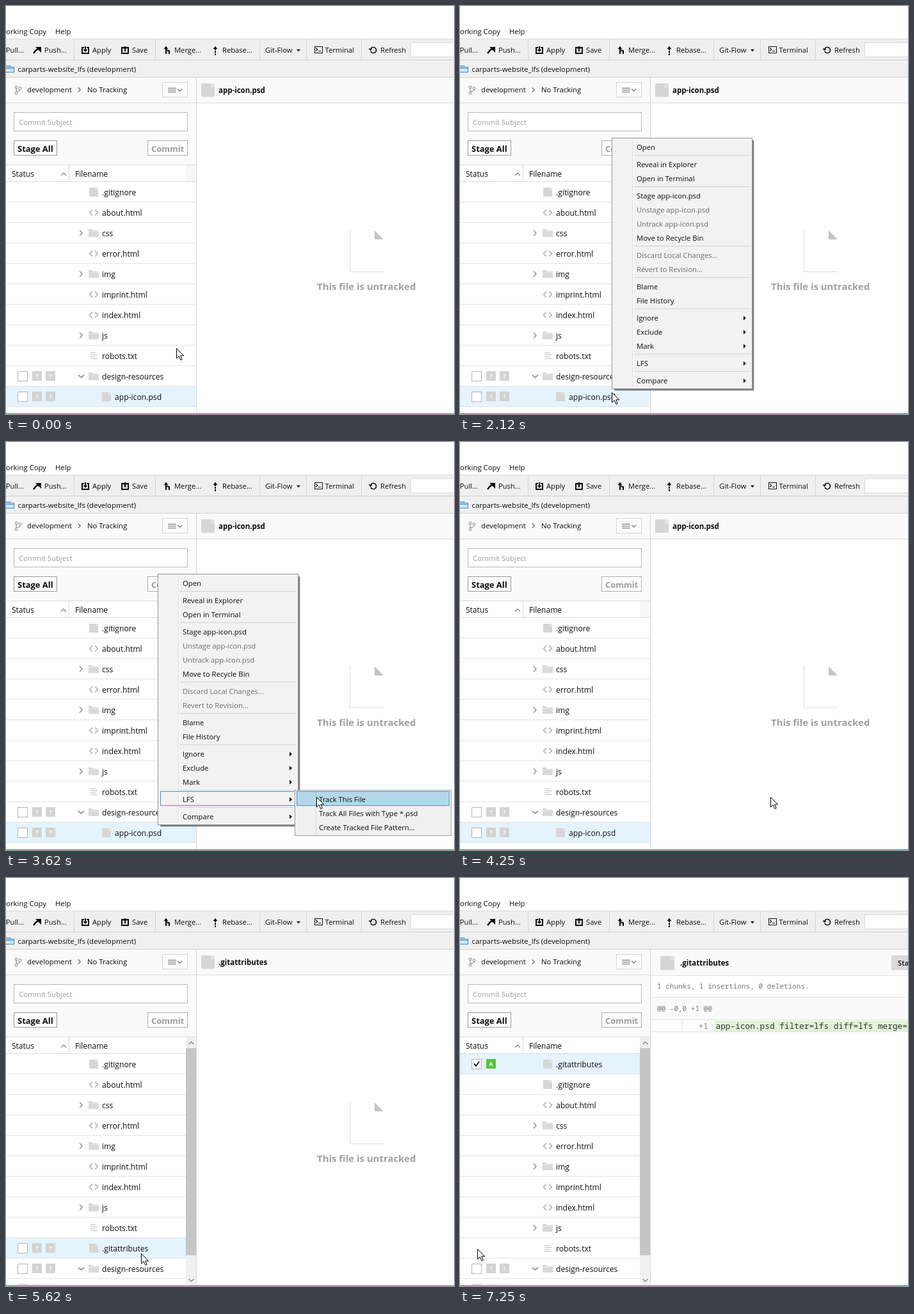
An HTML page with a canvas for the animation above (8000 ms loop, 700x638 px).

```html
<!DOCTYPE html>
<html lang="en">
<head>
<meta charset="utf-8">
<title>Tracking a file with LFS</title>
<style>
html, body { margin: 0; width: 100%; height: 100%; overflow: hidden; background: #fff; }
canvas { display: block; }
</style>
</head>
<body>
<canvas id="stage" width="700" height="638"></canvas>
<script>
const g = document.getElementById('stage').getContext('2d');
const LOOP = 8000, TICK = 125, ROW = 32;
const UI = '"Open Sans", "Noto Sans", sans-serif';
const MONO = '"Noto Sans Mono", "DejaVu Sans Mono", monospace';
const INK = '#0c0c0c', LINE = '#dcdcdc', ICON = '#d6d6d6', MUTED = '#9b9b9b';
const UP = 0, RIGHT = 1, DOWN = 2;

// ---- drawing helpers ----
function rect(x, y, w, h, fill) {
  g.fillStyle = fill;
  g.fillRect(x, y, w, h);
}
function frame(x, y, w, h, stroke, fill) {
  if (fill) rect(x, y, w, h, fill);
  g.strokeStyle = stroke;
  g.lineWidth = 1;
  g.strokeRect(x + .5, y + .5, w - 1, h - 1);
}
function text(s, x, y, { size = 11.35, color = INK, weight = 400, font = UI, align = 'left' } = {}) {
  g.font = `${weight} ${size}px ${font}`;
  g.fillStyle = color;
  g.textAlign = align;
  g.fillText(s, x, y);
}
function shape(points, fill) {
  g.beginPath();
  for (const [x, y] of points) g.lineTo(x, y);
  if (fill) {
    g.fillStyle = fill;
    g.fill();
  }
}
function stroke(points, color, width = 1) {
  shape(points);
  g.strokeStyle = color;
  g.lineWidth = width;
  g.stroke();
}
function ring(x, y, r, color, width, from = 0, to = 2 * Math.PI) {
  g.beginPath();
  g.arc(x, y, r, from, to);
  g.strokeStyle = color;
  g.lineWidth = width;
  g.stroke();
}
// An arrow head centred on x, y: half width w, half height h, pointing dir.
function head(x, y, dir, w, h) {
  const turn = dir * Math.PI / 2, c = Math.cos(turn), s = Math.sin(turn);
  return [[-w, h], [0, -h], [w, h]].map(([a, b]) => [x + a * c - b * s, y + a * s + b * c]);
}
const chevron = (x, y, dir, w, h, color = '#666', width = 1.1) => stroke(head(x, y, dir, w, h), color, width);
const triangle = (x, y, dir, w, h) => shape(head(x, y, dir, w, h), INK);

function faded(alpha, draw) {
  if (alpha <= 0) return;
  g.save();
  g.globalAlpha = alpha;
  draw();
  g.restore();
}

// ---- window chrome ----
function boxArrow(x, dir) {
  stroke([[x + 4, 65], [x + 1, 65], [x + 1, 74], [x + 11, 74], [x + 11, 65], [x + 8, 65]], INK, 2);
  rect(x + 5, 63, 2, 8, INK);
  triangle(x + 6, dir === UP ? 64.5 : 70, dir, 3.5, 2);
}
function toolIcons() {
  stroke([[43, 74], [47, 69], [52, 66]], INK, 2.4);
  shape([[46, 64], [55, 64], [55, 73]], INK);
  boxArrow(118, DOWN);
  boxArrow(180, UP);
  stroke([[250, 75], [250, 69], [255, 70], [255, 75]], INK, 2);
  rect(249, 64, 2, 6, INK);
  triangle(250, 65, UP, 3.5, 2.2);
  for (let i = 0; i < 3; i++) rect(326, 66 + 4 * i, 2, 3, INK);
  triangle(327, 65, UP, 3.5, 2.2);
  triangle(457, 69.5, DOWN, 3, 1.7);
  frame(482, 63, 13, 11, INK);
  chevron(485.5, 68, RIGHT, 2.5, 1.2, INK);
  rect(488, 70, 4, 1, INK);
  ring(574, 69, 4.5, INK, 1.6, -2.6, 2.7);
  triangle(569.5, 68.5, DOWN, 3, 2);
}
function toolbar() {
  rect(0, 51, 700, 34, '#efefef');
  rect(0, 51, 700, 1, LINE);
  rect(0, 84, 700, 1, '#cfcfcf');
  for (const x of [106, 233, 396, 469, 555]) rect(x, 52, 1, 32, '#d6d6d6');
  const labels = {
    'Push...': 60, Apply: 135, Save: 197, 'Merge...': 263, 'Rebase...': 338,
    'Git-Flow': 405, Terminal: 498.5, Refresh: 585
  };
  for (const name in labels) text(name, labels[name], 73, { size: 11.2 });
  text('Pull...', 28, 73, { size: 11.2, align: 'right' });
  toolIcons();
  frame(632, 57, 70, 23, LINE, '#fff');
}
function chrome() {
  rect(0, 0, 700, 638, '#fff');
  text('Working Copy', 63, 44, { align: 'right' });
  text('Help', 77, 44);
  toolbar();
  rect(0, 85, 700, 27, '#f0f0f0');
  rect(0, 111, 700, 1, '#d2d2d2');
  frame(-3, 93, 10, 5, '#3d8fc9');
  frame(-3, 95, 16, 9, '#3d8fc9', '#cfe6f7');
  rect(0, 97, 12, 1, '#3d8fc9');
  text('carparts-website_lfs (development)', 18.5, 103);
}
function button(label, x, w, color, border) {
  frame(x, 210, w, 24, border, '#fcfcfc');
  text(label, x + 6, 228, { size: 12.95, weight: 700, color });
}
function sidebar() {
  rect(0, 112, 297, 136, '#fafafa');
  rect(0, 151, 297, 1, LINE);
  ring(16, 127, 2, '#888', 1);
  ring(16, 136.5, 2, '#888', 1);
  ring(22, 128.5, 2, '#888', 1);
  stroke([[16, 129], [16, 134], [21, 133], [22, 130.5]], '#888');
  text('development', 33, 135);
  chevron(114.5, 131, RIGHT, 3.5, 1.8);
  text('No Tracking', 127, 135);
  frame(244, 119, 40, 24, '#d5d5d5', '#fcfcfc');
  for (let y = 128; y < 136; y += 3) rect(253, y, 13, 1, '#666');
  chevron(271.5, 131.5, DOWN, 3.5, 1.5);

  frame(12, 166, 272, 30, '#b8b8b8', '#fff');
  text('Commit Subject', 20, 186, { color: MUTED, size: 11.3 });
  button('Stage All', 12, 68, INK, '#9a9a9a');
  button('Commit', 221, 63, MUTED, '#b0b0b0');
}

// ---- file list ----
function page(x, y, s) {
  const cut = s * .3;
  shape([[x, y], [x + s - cut, y], [x + s, y + cut], [x + s, y + s], [x, y + s]], ICON);
  rect(x + s - cut, y, cut, cut, '#e2e2e2');
}
const icons = {
  file: (x, y) => page(x, y - 7, 14),
  code(x, y) {
    chevron(x + 2.7, y, -1, 4.5, 2.2, '#a2a2a2', 1.2);
    chevron(x + 11.3, y, RIGHT, 4.5, 2.2, '#a2a2a2', 1.2);
  },
  text(x, y) {
    for (let i = 0; i < 4; i++) rect(x + 2, y - 5 + i * 3, i % 2 ? 11 : 8, 1, '#bbb');
  },
  dir(x, y) {
    rect(x - 1, y - 6, 6, 2, ICON);
    rect(x - 1, y - 4, 16, 10, '#d9d9d9');
    rect(x - 1, y - 3, 16, 1, '#e8e8e8');
  }
};
const iconOf = name => /html$/.test(name) ? 'code' : /txt$/.test(name) ? 'text' : /\./.test(name) ? 'file' : 'dir';
const files = ['.gitignore', 'about.html', 'css', 'error.html', 'img', 'imprint.html', 'index.html', 'js', 'robots.txt'];
const ATTR = '.gitattributes', DESIGN = 'design-resources', PSD = 'app-icon.psd';

function tag(x, y, s, fill) {
  rect(x, y - 8, 15, 15, fill);
  text(s, x + 7.5, y + 3, { size: 8.5, weight: 700, color: '#fff', align: 'center' });
}
function status(y, staged, hover) {
  frame(18, y - 8, 16, 16, hover ? '#2583cc' : '#b4b4b4', '#fff');
  if (staged) {
    stroke([[22, y - .5], [25, y + 3], [30, y - 4]], '#222', 2);
    tag(41, y, 'A', '#5cc13f');
  } else {
    tag(41, y, '?', '#d3d3d3');
    tag(62, y, '?', '#d3d3d3');
  }
}
function row(name, y, width, s) {
  const x = name === PSD ? 150 : 130, icon = iconOf(name);
  if (name === s.selected) rect(0, y - 16, width, 31, '#e5f3fd');
  rect(0, y + 15, width, 1, '#e4e4e4');
  if (!files.includes(name)) status(y, name === ATTR && s.staged, name === ATTR && s.hoverBox);
  if (name === DESIGN) chevron(117.5, y, DOWN, 4.5, 2);
  else if (icon === 'dir') chevron(117, y, RIGHT, 4.5, 2);
  icons[icon](x, y);
  text(name, x + 20, y + 5, { size: 12.15 });
}
function list(s) {
  const width = s.scroll ? 281 : 297;
  rect(0, 248, 297, 390, '#fff');
  rect(0, 248, 297, 1, LINE);
  rect(98, 249, 1, 25, LINE);
  text('Status', 9, 267, { size: 12.05 });
  text('Filename', 108, 267, { size: 12.05 });
  chevron(90, 263, UP, 4, 2, '#777');
  if (!s.scroll) rect(281, 249, 16, 25, '#f7f7f7');
  rect(0, 274, width, 1, '#d3dcd8');

  const rows = [...files, DESIGN, PSD];
  if (s.added) rows.splice(s.staged ? 0 : files.length, 0, ATTR);
  g.save();
  g.beginPath();
  g.rect(0, 275, 297, 361);
  g.clip();
  rows.forEach((name, i) => row(name, 291 + ROW * i, width, s));
  g.restore();

  if (s.scroll) {
    rect(281, 249, 16, 388, '#f0f0f0');
    rect(281, 266, 16, 324, '#c6c6c6');
    chevron(289.5, 258, UP, 4, 2, '#777');
    chevron(289.5, 629, DOWN, 4, 2, '#777');
  }
}

// ---- right pane ----
function title(name, x, y, size) {
  page(x, y, size);
  text(name, x + size + 6 + (size > 21 ? 3 : 0), y + 15, { size: 11.5, weight: 700 });
}
function untracked(name) {
  rect(298, 112, 402, 39, '#fafafa');
  rect(298, 151, 402, 1, LINE);
  title(name, 305, 121, 21);
  stroke([[537.5, 350], [537.5, 415.5], [590, 415.5]], '#dedede');
  shape([[576, 351], [590, 365], [576, 365]], '#c4c4c4');
  text('This file is untracked', 486, 444, { size: 14.95, weight: 700, color: '#a0a0a0' });
}
function diff() {
  const note = { font: MONO, size: 11, color: '#777' };
  const code = { font: MONO, size: 12.8, color: '#333' };
  rect(298, 112, 402, 526, '#fff');
  rect(298, 112, 402, 40, '#fafafa');
  rect(298, 186, 402, 36, '#fafafa');
  for (const y of [152, 186, 221, 240]) rect(298, y, 402, 1, '#e4e4e4');
  title(ATTR, 313, 122, 22);
  rect(674, 121, 26, 23, '#d9d9d9');
  text('Stage', 684, 137, { size: 11.3, weight: 600 });
  text('1 chunks, 1 insertions, 0 deletions.', 308, 173, note);
  text('@@ -0,0 +1 @@', 308, 208, note);
  rect(298, 222, 100, 18, '#fcfcfc');
  rect(347, 222, 1, 18, '#e6e6e6');
  rect(398, 223, 302, 17, '#dff4d6');
  text('+1', 372.5, 236, { ...code, color: '#888' });
  text('app-icon.psd filter=lfs diff=lfs merge=lfs -text', 399.5, 236, code);
}

// ---- context menus: "-" separates, "!" disables, ">" opens a submenu ----
const entries = ['Open', '-', 'Reveal in Explorer', 'Open in Terminal', '-',
  'Stage app-icon.psd', '!Unstage app-icon.psd', '!Untrack app-icon.psd', 'Move to Recycle Bin', '-',
  '!Discard Local Changes...', '!Revert to Revision...', '-', 'Blame', 'File History', '-',
  '>Ignore', '>Exclude', '>Mark', '-', '>LFS', '-', '>Compare'];
const lfsEntries = ['Track This File', 'Track All Files with Type *.psd', 'Create Tracked File Pattern...'];
const menuText = { size: 11.3 };

function menu(s) {
  rect(242, 211, 218, 391, 'rgba(0,0,0,.15)');
  rect(241, 210, 218, 391, 'rgba(0,0,0,.42)');
  frame(237, 206, 220, 393, '#979797', '#f2f2f2');
  rect(269, 209, 1, 387, '#dcdcdc');
  rect(270, 209, 1, 387, '#fff');
  let y = 221;
  for (const entry of entries) {
    if (entry === '-') {
      rect(271, y - 10, 183, 1, '#d2d2d2');
      y += 5;
      continue;
    }
    const name = entry.replace(/^[!>]/, '');
    if (name === s.hot) frame(241, y - 13, 213, 23, '#3a9cc2');
    text(name, 276, y + 4, { ...menuText, color: entry[0] === '!' ? '#6d6d6d' : INK });
    if (entry[0] === '>') triangle(445, y, RIGHT, 3.5, 2);
    y += 22;
  }
}
function submenu(s) {
  frame(451, 544, 245, 72, '#a0a0a0', '#f0f0f0');
  rect(484, 546, 1, 68, '#d7d7d7');
  if (s.hotSub) {
    frame(454, 546, 239, 23, '#3a9cc2', '#b5d7e9');
    rect(484, 547, 1, 21, '#92bccf');
  }
  lfsEntries.forEach((name, i) => text(name, 489, 563 + 22 * i, menuText));
}

function cursor(x, y) {
  g.save();
  g.translate(Math.round(x) + .5, Math.round(y) + .5);
  shape([[0, 0], [0, 15.5], [3.7, 12], [6.3, 18], [8.7, 17], [6.2, 11.3], [11.2, 11.3]], '#fff');
  g.closePath();
  g.strokeStyle = '#000';
  g.lineWidth = 1;
  g.stroke();
  g.restore();
}

// ---- timeline, counted in ticks ----
const span = (k, from, ticks) => Math.max(0, Math.min(1, (k - from + 1) / ticks));
const home = { x: 266, y: 535 };
const moves = [
  { from: 8, ticks: 5, x: 237, y: 604, bow: .78 },
  { from: 19, ticks: 4, x: 310, y: 557, bow: 0 },
  { from: 24, ticks: 6, x: 485, y: 555, bow: 0 },
  { from: 40, ticks: 4, x: 211, y: 587, bow: .13 },
  { from: 48, ticks: 7, x: 27, y: 580, bow: 0 }
];
function pointer(k) {
  let { x, y } = home;
  for (const m of moves) {
    const p = span(k, m.from, m.ticks), u = p * p * (3 - 2 * p);
    const dx = m.x - x, dy = m.y - y, side = 2 * m.bow * u * (1 - u);
    x += dx * u + dy * side;
    y += dy * u - dx * side;
    if (p < 1) break;
  }
  return { x, y };
}
function stateAt(k) {
  const { x, y } = pointer(k);
  const open = 1 - span(k, 31, 4);
  const staged = k >= 56;
  return {
    x, y, staged,
    menu: Math.min(span(k, 15, 3), open),
    sub: Math.min(span(k, 25, 2), open),
    hot: y > 598 ? '' : y > 572 ? 'Compare' : 'LFS',
    hotSub: x > 452,
    added: k >= 35,
    scroll: k >= 36,
    selected: k >= 45 ? ATTR : PSD,
    hoverBox: x < 34 && !staged,
    diff: span(k, 56, 4) * 2
  };
}

function draw(time) {
  const k = Math.floor((time + 5) / TICK) % (LOOP / TICK);
  const s = stateAt(k);
  chrome();
  sidebar();
  list(s);
  untracked(s.selected);
  faded(k < 58 ? Math.min(.5, s.diff) : 1, diff);
  rect(297, 112, 1, 525, '#d6d6d6');
  rect(0, 637, 700, 1, '#2a9470');
  faded(s.menu, () => menu(s));
  faded(s.sub, () => submenu(s));
  cursor(s.x, s.y);
}

let start;
function tick(now) {
  start ??= now;
  draw(now - start);
  requestAnimationFrame(tick);
}
requestAnimationFrame(tick);
</script>
</body>
</html>
```
